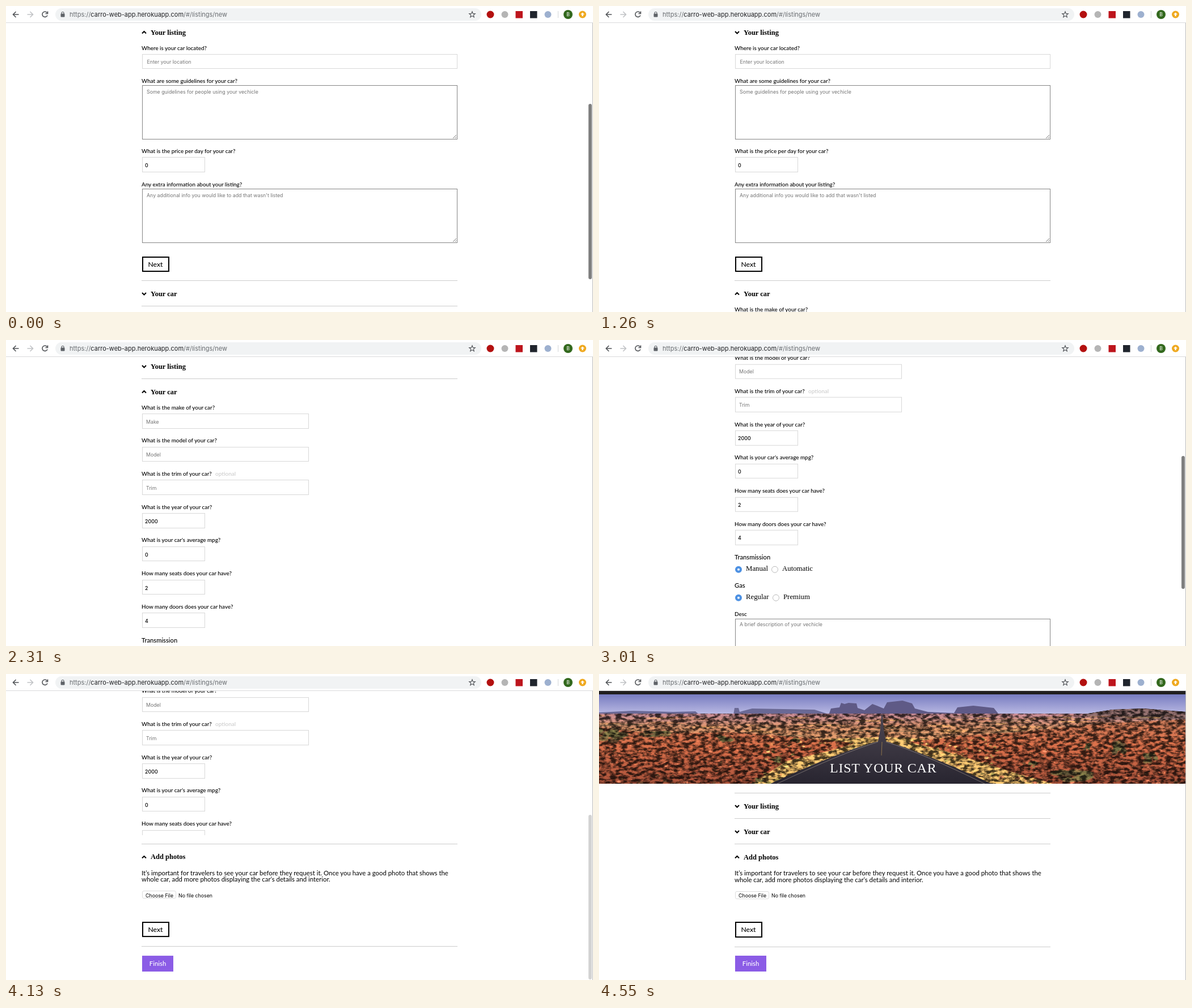
An HTML page for the animation above (4620 ms loop, 1035 px wide and 541 px high).

```html
<!DOCTYPE html>
<html lang="en">
<head>
<meta charset="utf-8">
<title>List your car</title>
<style>
html, body { margin: 0; width: 100%; height: 100%; overflow: hidden; background: #fff; }
#stage { position: relative; width: 1035px; height: 541px; overflow: hidden; background: #fff; color: #000; }
#view { position: absolute; inset: 30px 0 0; overflow: hidden; }
#doc { position: absolute; left: 0; top: 0; width: 1035px; }
#nav { height: 56px; background: #211f1f; }
#hero { display: block; height: 158px; }
#form { position: absolute; left: 239px; top: 230px; width: 557px; }
section { position: relative; border-top: 1px solid #ccc; margin-bottom: -1px; }
section > .body { position: relative; overflow: hidden; margin-bottom: 15.5px; }
section::before { content: ""; display: block; height: 29.5px; }
section h2 { position: absolute; left: 16px; top: 22.5px; margin: 0; transform: translateY(-50%);
  font: bold 12.5px "Liberation Serif", serif; white-space: nowrap; }
section > svg { position: absolute; left: 0; top: 18px; }
.inner { position: absolute; left: 0; top: -7px; }
.t { position: absolute; transform: translateY(-50%); white-space: nowrap; }
.label { font: 500 9.9px Lato, sans-serif; }
.group { font: 500 11.2px Lato, sans-serif; }
.hint { font: 8.8px Inter, sans-serif; color: #757575; }
.value { font: 500 8.9px Inter, sans-serif; }
.para { font: 11.36px Lato, sans-serif; }
.choice { font: 12.8px "Liberation Serif", serif; }
.small { font: 8.8px Inter, sans-serif; }
.optional { font: 500 10px Lato, sans-serif; color: #ccc; }
.box { position: absolute; box-sizing: border-box; border: 1px solid #d8d8d8; background: #fff; }
.area { border-color: #858585; }
.next { border: 2px solid #000; font: 500 12.2px/23px Lato, sans-serif; text-align: center; }
.file { border-color: #ddd; border-radius: 3px; }
.radio { position: absolute; box-sizing: border-box; width: 12px; height: 12px; border-radius: 50%; border: 1px solid #bbb; background: #fff; }
.radio.on { border: 4px solid #4d91e3; }
.num svg { position: absolute; right: 6px; top: 7px; visibility: hidden; }
#end { border-top: 1px solid #ccc; }
#finish { position: absolute; margin-top: 15.5px; left: 1px; width: 55px; height: 28px; background: #8b5ce6; color: #fff;
  font: 500 11.3px/27px Lato, sans-serif; text-align: center; }
#thumb { position: absolute; left: 1027px; width: 6px; border-radius: 3px; background: #808080; }
#bar { position: absolute; left: 0; top: 0; }
#edge { position: absolute; right: 0; top: 30px; width: 1px; bottom: 0; background: #bbb; }
</style>
</head>
<body>
<div id="stage">
  <div id="view">
    <div id="doc">
      <div id="nav"></div>
      <svg id="hero" width="1035" height="158" viewBox="0 0 1035 158">
        <defs>
          <linearGradient id="sky" x2="0" y2="1"><stop stop-color="#777cc0"/><stop offset="1" stop-color="#c3c2e8"/></linearGradient>
          <linearGradient id="land" x2="0" y2="1"><stop stop-color="#7d5860"/><stop offset=".2" stop-color="#8f6146"/><stop offset="1" stop-color="#9a7044"/></linearGradient>
          <linearGradient id="dirt" x2="0" y2="1"><stop stop-color="#84503a"/><stop offset=".4" stop-color="#8a472f"/><stop offset="1" stop-color="#6b3425"/></linearGradient>
          <linearGradient id="road" x2="0" y2="1"><stop stop-color="#4c4651"/><stop offset="1" stop-color="#282530"/></linearGradient>
          <filter id="rough" x="0" y="0" width="1" height="1" color-interpolation-filters="sRGB">
            <feTurbulence type="fractalNoise" baseFrequency=".1 .2" numOctaves="4" seed="4"/>
            <feColorMatrix values="3.400 0 0 0 -1.200 3.400 0 0 0 -1.200 3.400 0 0 0 -1.200 0 0 0 0 1" result="grain"/>
            <feComposite in="SourceGraphic" in2="grain" operator="arithmetic" k1="1.200" k2=".4"/>
          </filter>
        </defs>
        <rect width="1035" height="40" fill="url(#sky)"/>
        <path fill="#6a6995" d="M0 32L60 29 130 31 170 30 176 35 237 36 239 24 246 24 248 31 270 25 380 27 408 36V42H0Z"/>
        <path fill="#5f5a86" d="M405 36L409 25 424 23 427 15 433 17 440 15 454 16 456 24 468 28 482 17 490 20 502 25 508 14 535 11 552 16 557 25 580 31 626 33 632 23 660 20 696 24 704 34V42H405Z"/>
        <g filter="url(#rough)">
          <rect y="34" width="1035" height="124" fill="url(#land)"/>
          <path fill="#5d4746" d="M850 36L905 27 960 25 1035 31V44L900 45Z"/>
          <g id="plain"></g>
          <path fill="#a38149" d="M300 82L485 76 515 76 700 84 880 158H150Z"/>
          <path fill="url(#dirt)" d="M0 58L90 69 235 67 330 74 452 86 410 99 330 118 270 158H0ZM546 84L640 73 740 67 880 52 1035 44V158H800L715 133 610 100Z"/>
          <g id="scrub"></g>
        </g>
        <path fill="url(#road)" d="M498 36H500L502 62 506 83Q570 102 692 158H302Q430 99 492 83L496 62Z"/>
        <path fill="none" stroke="#bcb1a6" stroke-width=".8" opacity=".6" d="M492 84Q430 103 314 158M506 84Q570 104 680 158"/>
        <path fill="none" stroke="#c39b53" stroke-width="1" opacity=".6" d="M499 84L498 108"/>
        <text x="407" y="138" fill="#fff" font-family="Liberation Serif, serif" font-size="24" letter-spacing=".75">LIST YOUR CAR</text>
      </svg>
      <div id="form"></div>
    </div>
  </div>
  <div id="edge"></div>
  <div id="thumb"></div>
  <svg id="bar" width="1035" height="31" fill="none" stroke-width="1.6">
    <rect width="1035" height="30" fill="#fff"/>
    <path d="M0 29.5H1035" stroke="#d9dadc" stroke-width="1"/>
    <rect x="87" y="4" width="751" height="22" rx="11" fill="#f1f3f4"/>
    <path d="M22.500 15H13M17.500 10L12.500 15 17.500 20" stroke="#505357"/>
    <path d="M37.500 15H47M42.500 10L47.500 15 42.500 20" stroke="#c0c2c5"/>
    <path d="M72.500 12A4.700 4.700 0 1 0 73 16.500M73.500 9.500V13.500H69.500" stroke="#505357"/>
    <rect x="96.500" y="13.500" width="7" height="6" rx="1" fill="#5f6368"/>
    <path d="M98 14V12.500A2 2 0 0 1 102 12.500V14" stroke="#5f6368" stroke-width="1.200"/>
    <text x="112" y="19" font-family="Inter, sans-serif" font-size="11" fill="#686c70">https://<tspan fill="#202124">carro-web-app.herokuapp.com</tspan>/#/listings/new</text>
    <path d="M822 9.800L823.400 13.400 827.300 13.600 824.300 16 825.300 19.800 822 17.600 818.700 19.800 819.700 16 816.700 13.600 820.600 13.400Z" stroke="#505357" stroke-width="1.100"/>
    <circle cx="854" cy="15" r="6.500" fill="#b3100f"/>
    <circle cx="879.500" cy="15" r="6" fill="#b5b5b5"/>
    <rect x="898.500" y="9" width="12.500" height="12.500" fill="#bd151d"/>
    <rect x="924" y="9" width="12.500" height="12.500" fill="#20252d"/>
    <circle cx="955.500" cy="15" r="6" fill="#9db0cf"/>
    <path d="M973.500 9V21" stroke="#d5d7d9" stroke-width="1"/>
    <circle cx="991" cy="15" r="8" fill="#33691e"/>
    <text x="991" y="18.200" text-anchor="middle" font-family="Roboto, sans-serif" font-size="9" fill="#fff">B</text>
    <circle cx="1016.500" cy="15" r="6.500" fill="#efa920"/>
    <path d="M1016.500 11.500L1020 15H1017.700V18H1015.300V15H1013Z" fill="#fff"/>
  </svg>
</div>
<script>
const $ = id => document.getElementById(id);

// Form markup: x from the column edge, y from the section heading's centre.
const text = (cls, x, y, s) => `<div class="t ${cls}" style="left:${x}px;top:${y}px">${s}</div>`;
const box = (cls, x, y, w, h, s = '') =>
  `<div class="box ${cls}" style="left:${x}px;top:${y}px;width:${w}px;height:${h}px">${s}</div>`;
const area = (y, hint) => box('area', .5, y, 556, 95.5,
  `<svg width="8" height="8" style="position:absolute;right:0;bottom:0"><path d="M1 7L7 1M4.500 7L7 4.500" stroke="#777"/></svg>`)
  + text('hint', 9, y + 10.5, hint);
const spinner = `<svg width="7" height="12"><rect width="7" height="12" rx="2" fill="#eee"/>
  <path d="M2 4.500L3.500 2.500 5 4.500M2 7.500L3.500 9.500 5 7.500" fill="none" stroke="#666"/></svg>`;
const number = (y, v) => box('num', .5, y, 111, 26.5, spinner) + text('value', 6, y + 14, v);
const next = y => box('next', .5, y, 48, 27.5, 'Next');
const radio = (x, y, name, on) => `<div class="radio ${on}" style="left:${x}px;top:${y - 6}px"></div>`
  + text('choice', x + 19, y - .5, name);

const listing = text('label', 0, 27, 'Where is your car located?')
  + box('', .5, 38, 556, 26.5) + text('hint', 9.5, 51.5, 'Enter your location')
  + text('label', 0, 85, 'What are some guidelines for your car?')
  + area(93.5, 'Some guidelines for people using your vechicle')
  + text('label', 0, 209, 'What is the price per day for your car?') + number(220.5, 0)
  + text('label', 0, 268, 'Any extra information about your listing?')
  + area(276.5, "Any additional info you would like to add that wasn't listed")
  + next(396);

const questions = [
  ['What is the make of your car?', 'Make'],
  ['What is the model of your car?', 'Model'],
  ['What is the trim of your car?', 'Trim'],
  ['What is the year of your car?', 2000],
  ["What is your car's average mpg?", 0],
  ['How many seats does your car have?', 2],
  ['How many doors does your car have?', 4]
];
const car = questions.map(([q, v], i) => {
  const y = 27 + i * 58.7;
  const field = typeof v === 'number' ? number(y + 11.5, v)
    : box('', .5, y + 11.5, 294, 26.5) + text('hint', 8, y + 25, v);
  return text('label', 0, y, q) + field;
}).join('')
  + text('optional', 130, 144.4, 'optional')
  + text('group', 0, 438.5, 'Transmission') + radio(1, 460, 'Manual', 'on') + radio(65, 460, 'Automatic', '')
  + text('group', 0, 488.5, 'Gas') + radio(1, 510, 'Regular', 'on') + radio(67, 510, 'Premium', '')
  + text('label', 0, 538, 'Desc') + area(547, 'A brief description of your vechicle')
  + next(666.5);

const photos = text('para', 0, 27.5, 'It’s important for travelers to see your car before they request it. Once you have a good photo that shows the')
  + text('para', 0, 39, 'whole car, add more photos displaying the car’s details and interior.')
  + box('file', 1, 60, 60, 14) + text('small', 7, 67.3, 'Choose File') + text('small', 65, 67.3, 'No file chosen')
  + next(114.5);

const sections = [
  { title: 'Your listing', html: listing, full: 417, open: -1e4, close: 1170 },
  { title: 'Your car', html: car, full: 687.5, open: 1170, close: 3936 },
  { title: 'Add photos', html: photos, full: 136.5, open: 3936, close: 1e5 }
];
$('form').innerHTML = sections.map(s => `<section>
  <h2>${s.title}</h2><svg width="9" height="9"><path fill="none" stroke="#000" stroke-width="2"/></svg>
  <div class="body"><div class="inner">${s.html}</div></div></section>`).join('')
  + '<div id="end"><div id="finish">Finish</div></div>';
document.querySelectorAll('section').forEach((el, i) => {
  sections[i].body = el.querySelector('.body');
  sections[i].chevron = el.querySelector('svg path');
});
const numbers = [...document.querySelectorAll('.num')];

// Desert vegetation and rocks
let seed = 11;
const rnd = () => (seed = (seed * 16807) % 2147483647) / 2147483647;
const pick = list => list[Math.floor(rnd() * list.length)];
const blob = (x, y, rx, ry, fill) =>
  `<ellipse cx="${x.toFixed(1)}" cy="${y.toFixed(1)}" rx="${rx.toFixed(1)}" ry="${ry.toFixed(1)}" fill="${fill}" opacity=".7"/>`;
let plain = '', scrub = '';
for (let i = 0; i < 150; i++) {
  plain += blob(rnd() * 1035, 37 + rnd() * 36, 8 + rnd() * 30, .5 + rnd(), pick(['#74523c', '#a87a48', '#84543f', '#63513a']));
}
for (let i = 0; i < 1000; i++) {
  const x = rnd() * 1035, d = Math.abs(x - 499) / 520;
  const top = 80 - 22 * d, y = top + rnd() * (158 - top), size = .5 + rnd() * 1.5 * (y / 100);
  const colors = d > .4 ? ['#a5583a', '#4a241c', '#b4674a', '#5e2e21', '#40301f'] : ['#b8924f', '#80703a', '#96603a', '#6f713a', '#c4a05c'];
  scrub += blob(x, y, size * 1.7, size, pick(colors));
}
[[20, 72, 32, 14], [100, 70, 30, 6], [222, 78, 16, 8], [313, 117, 12, 7], [345, 82, 9, 5], [830, 146, 42, 13],
 [922, 95, 18, 14], [765, 124, 9, 6], [972, 112, 14, 10], [285, 152, 10, 5], [862, 92, 8, 8]]
  .forEach(([x, y, w, h]) => {
    for (let k = 0; k < 14; k++) {
      scrub += blob(x + (rnd() - .5) * w * 1.5, y + (rnd() - .5) * h * 1.4, w * .3, h * .35, pick(['#4b4a2c', '#5a5632', '#383222']));
    }
  });
$('plain').innerHTML = plain;
$('scrub').innerHTML = scrub;

// Motion
const LOOP = 4620, STEP = 70, VIEW = 511, POINTER_Y = 452;
const clamp = v => Math.max(0, Math.min(1, v));
const ramp = (t, from, to) => clamp((t - from) / (to - from));
const smooth = u => u * u * (3 - 2 * u);
const bez = (a, b, s) => 3 * a * s * (1 - s) ** 2 + 3 * b * s * s * (1 - s) + s ** 3;
function ease(u) {
  let lo = 0, hi = 1;
  for (let i = 0; i < 24; i++) {
    const mid = (lo + hi) / 2;
    if (bez(.25, .25, mid) < u) lo = mid; else hi = mid;
  }
  return bez(.1, 1, lo);
}

function render(t) {
  let docHeight = 424.5;
  for (const s of sections) {
    // Panels animate a max-height limit of 1000px over half a second.
    const limit = 1000 * (ease(ramp(t, s.open, s.open + 500)) - ease(ramp(t, s.close, s.close + 500)));
    const height = Math.max(0, Math.min(s.full, limit));
    s.body.style.height = height + 'px';
    s.chevron.setAttribute('d', t >= s.open && t < s.close ? 'M1 6.500L4.500 3 8 6.500' : 'M1 3L4.500 6.500 8 3');
    docHeight += height;
  }
  const wanted = 237 + 325.5 * smooth(ramp(t, 2404, 3704));
  const scroll = Math.min(wanted, docHeight - VIEW);
  $('doc').style.transform = `translateY(${-scroll}px)`;

  const thumb = $('thumb').style;
  thumb.top = 29 + scroll * VIEW / docHeight + 'px';
  thumb.height = VIEW * VIEW / docHeight + 'px';
  thumb.opacity = 1 - ramp(t, 350, 560) + ramp(t, 2380, 2450) - ramp(t, 4000, 4200);

  const stageTop = $('stage').getBoundingClientRect().top;
  for (const el of numbers) {
    const r = el.getBoundingClientRect(), y = POINTER_Y + stageTop;
    el.firstChild.style.visibility = r.top <= y && y < r.bottom ? 'visible' : 'hidden';
  }
}

const start = performance.now();
function tick() {
  const t = (performance.now() - start) % LOOP;
  render(Math.floor(t / STEP) * STEP);
  requestAnimationFrame(tick);
}
tick();
</script>
</body>
</html>
```
